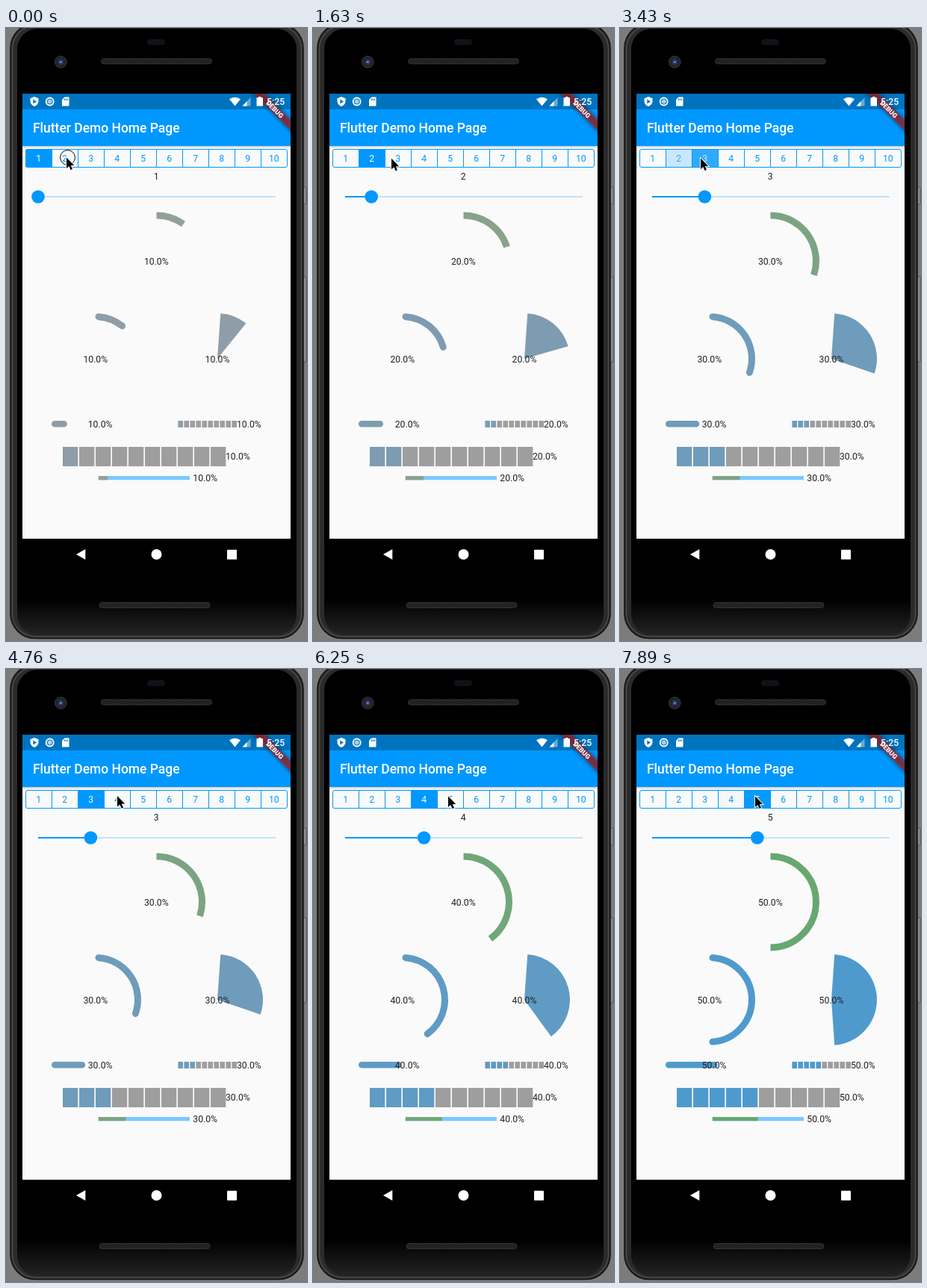
An HTML page that plays this animation: 403 px wide and 821 px high, repeating every 8000 ms.

```html
<!DOCTYPE html>
<html lang="en">
<head>
<meta charset="utf-8">
<style>
html, body { margin: 0; width: 100%; height: 100%; overflow: hidden; background: #7c7c7c; }
svg { display: block; font: 12.23px Roboto, sans-serif; fill: #212121; }
.mid { text-anchor: middle; }
.white { fill: #fff; }
.bold { font-weight: 500; }
</style>
</head>
<body>
<svg id="stage" width="403" height="821" viewBox="0 0 403 821">
  <defs>
    <linearGradient id="shade" x2="0" y2="1">
      <stop stop-color="#000" stop-opacity=".28"/><stop offset="1" stop-color="#000" stop-opacity="0"/>
    </linearGradient>
    <linearGradient id="front" x2="0" y2="1">
      <stop offset=".94"/><stop offset="1" stop-color="#242424"/>
    </linearGradient>
    <pattern id="mesh" width="3" height="3" patternUnits="userSpaceOnUse">
      <rect width="3" height="3" fill="#151515"/><path d="M0 3L3 0" stroke="#3c3c3c"/>
    </pattern>
    <clipPath id="screen"><rect x="22" y="88" width="359" height="596"/></clipPath>
    <filter id="blur" y="-1" height="3"><feGaussianBlur stdDeviation="3"/></filter>
  </defs>

  <!-- phone body -->
  <g fill="#8f8f8f" stroke="#444" stroke-width=".8">
    <rect x="397" y="213" width="5" height="23" rx="1"/>
    <rect x="397" y="333" width="5" height="114" rx="1"/>
  </g>
  <rect x="6" y="-6" width="392" height="823.5" rx="33" fill="#2b2b2b" stroke="#161616" stroke-width="1.6"/>
  <rect x="8.5" y="-3" width="387" height="818" rx="31" fill="none" stroke="#4c4c4c" stroke-width="1.4"/>
  <rect x="15" y="1" width="374" height="812" rx="27" fill="url(#front)"/>
  <g fill="url(#mesh)" stroke="#343434">
    <rect x="127.500" y="41" width="148" height="7" rx="3.500"/>
    <rect x="125" y="769.500" width="148" height="7" rx="3.500"/>
  </g>
  <rect x="189" y="15" width="24" height="8" rx="4" fill="#11111a"/>
  <circle cx="73.300" cy="45.500" r="7.800" fill="#20222a" stroke="#3d3d40"/>
  <circle cx="73.300" cy="45.500" r="4" fill="#26355a"/>
  <circle cx="73.300" cy="45.500" r="1.600" fill="#7286b0"/>
  <g class="white">
    <path d="M94 705L106.300 698V712Z"/><circle cx="201.500" cy="705" r="7"/>
    <rect x="296" y="698.700" width="13" height="13" rx="1"/>
  </g>

  <!-- app -->
  <g clip-path="url(#screen)">
    <rect x="22" y="88" width="359" height="596" fill="#fafafa"/>
    <rect x="22" y="157" width="359" height="4" fill="url(#shade)"/>
    <rect x="22" y="88" width="359" height="70" fill="#0098ff"/>
    <rect x="22" y="88" width="359" height="21" fill="#0073bf"/>
    <text class="white bold" x="36" y="140" font-size="17.47">Flutter Demo Home Page</text>
    <g id="segs"></g>
    <rect x="26.500" y="162.500" width="350" height="24" rx="2.500" fill="none" stroke="#0098ff"/>
    <g id="body"></g>
    <g transform="translate(381 88) rotate(45)">
      <rect x="-55" y="24.500" width="110" height="10.500" opacity=".5" fill="#000" filter="url(#blur)"/>
      <rect x="-55" y="24.500" width="110" height="10.500" fill="#b71c1c" fill-opacity=".63"/>
      <text class="mid white" y="32.900" font-size="8.9" font-weight="900">DEBUG</text>
    </g>
    <g class="white">
      <path d="M38 92L43.500 94.300V98Q43.500 102.500 38 105Q32.500 102.500 32.500 98V94.300Z"/>
      <path d="M36.300 95.500V101.500L41 98.500Z" fill="#0073bf"/>
      <circle cx="58.700" cy="98.500" r="5" fill="none" stroke="#fff" stroke-width="1.8"/>
      <circle cx="58.700" cy="98.500" r="3" fill="#a9cfea"/>
      <path d="M78.500 92.500H84.500V104.500H75V96Z"/>
      <path d="M78.500 94.500v2.500m2-2.500v2.500m2-2.500v2.500" stroke="#0073bf"/>
      <path d="M299 95.300Q306.500 90 314 95.300L306.500 104.500Z"/>
      <path d="M316.500 104.500L327.500 93V104.500Z" opacity=".4"/>
      <path d="M316.500 104.500L322.500 98.200V104.500Z"/>
      <path d="M335.500 93.200H338V92H341.500V93.200H344V104.500H335.500Z"/>
      <text class="bold" x="349" y="103">5:25</text>
    </g>
  </g>
  <g id="pointer">
    <circle id="ring" cx="1.500" cy="0" r="9.900" fill="none" stroke="#000"/>
    <path d="M0 0V14.500L3.300 11.500L5.600 16.500L8 15.400L5.800 10.500H10.200Z" stroke="#fff" stroke-width="1.800" paint-order="stroke" fill="#000"/>
  </g>
</svg>
<script>
const $ = id => document.getElementById(id);
const BLUE = [0, 152, 255], WHITE = [255, 255, 255], GREY = [158, 158, 158];
const LOOP = 8000, TICK = 148.7;            // the screen is refreshed once per tick
const FADE = 180, TOUCH = 40, GLIDE = 222;  // durations in ms

// each tap moves the value up by one
const TAPS = [
  { press: 0, select: 700 },
  { press: 3120, select: 3275 },
  { press: 5500, select: 5530 },
  { press: 7580, select: 7705 }
];
// the pointer rests at START, then glides to each stop
const START = { x: 81, y: 173.5 };
const STOPS = [
  { at: 0, x: 81, y: 177 },
  { at: 1311, x: 108, y: 174.5 },
  { at: 3788, x: 155, y: 172.5 },
  { at: 4450, x: 149, y: 170 },
  { at: 6017, x: 181, y: 170.5 }
];

const clamp = k => Math.max(0, Math.min(1, k));
const smooth = k => k * k * (3 - 2 * k);
const lerp = (a, b, k) => a + (b - a) * k;
const mix = (a, b, k) => `rgb(${a.map((c, i) => Math.round(lerp(c, b[i], k)))})`;

const text = (s, x, y, cls = '') => `<text x="${x}" y="${y}" class="${cls}">${s}</text>`;
const rect = (x, y, w, h, fill) => `<rect x="${x}" y="${y}" width="${w}" height="${h}" fill="${fill}"/>`;
const line = (x1, x2, y, color, w, cap = 'butt') =>
  `<path d="M${x1} ${y}H${x2}" stroke="${color}" stroke-width="${w}" stroke-linecap="${cap}"/>`;

// clockwise from twelve o'clock
function arc(cx, cy, r, from, to) {
  const at = deg => {
    const a = deg * Math.PI / 180;
    return `${cx + r * Math.sin(a)} ${cy - r * Math.cos(a)}`;
  };
  return `${at(from)}A${r} ${r} 0 0 1 ${at(to)}`;
}

function cells(x, y, pitch, w, h, value, color) {
  let out = '';
  for (let i = 0; i < 10; i++) out += rect(x + i * pitch, y, w, h, i < value ? color : '#9e9e9e');
  return out;
}

function segments(t) {
  let out = '';
  for (let i = 1; i <= 10; i++) {
    const x = 26.5 + (i - 1) * 35;
    // cell i fills on tap i - 2 and empties on tap i - 1
    const since = n => TAPS[n] ? t - TAPS[n].select : -LOOP;
    const filled = i === 1 ? 1 : clamp(since(i - 2) / FADE);
    const tint = filled - clamp(since(i - 1) / FADE);
    const touched = since(i - 2) < 0 && since(i - 2) > -TOUCH;
    out += `<rect x="${x}" y="162.5" width="35" height="24" fill="#0098ff" fill-opacity="${touched ? .2 : tint}"/>`;
    if (i > 1) out += rect(x - .5, 162.5, 1, 24, '#0098ff');
    out += `<text class="mid" x="${x + 17.3}" y="178.8" fill="${mix(BLUE, WHITE, tint)}">${i}</text>`;
  }
  return out;
}

function gauges(v) {
  const green = mix(GREY, [46, 178, 66], v / 10), blue = mix(GREY, [0, 150, 252], v / 10);
  const label = v * 10 + '.0%', knob = 43 + (v - 1) * 35.2;
  const gap = 4, end = Math.min(gap + 35 * v, 180 - gap);
  return text(v, 201.3, 202.5, 'mid') +
    line(43, 361, 226, '#bfe3fd', 1.8) + line(43, knob, 226, '#0098ff', 1.8) +
    `<circle cx="${knob}" cy="226" r="8.8" fill="#0098ff"/>` +
    `<path d="M${arc(201.5, 312, 61, 0, v * 36)}" fill="none" stroke="${green}" stroke-width="9"/>` +
    `<path d="M${arc(120, 443, 56.5, gap, end)}" fill="none" stroke="${blue}" stroke-width="9" stroke-linecap="round"/>` +
    `<path d="M283 443L${arc(283, 443, 61, gap, end)}Z" fill="${blue}"/>` +
    text(label, 201.3, 316.7, 'mid') + text(label, 119.8, 447.7, 'mid') + text(label, 283, 447.7, 'mid') +
    line(65.3, 65.3 + 12.2 * v, 530.3, blue, 8.6, 'round') + text(label, 109.7, 534.8) +
    cells(230.4, 526, 8, 6.6, 9, v, blue) + text(label, 309, 534.8) +
    cells(76, 561, 22, 20.3, 26, v, blue) + text(label, 294, 578.3) +
    line(123.8, 246, 602.7, '#7ac8ff', 5.3) + line(123.8, 123.8 + 12.2 * v, 602.7, green, 5.3) +
    text(label, 250.3, 607.2);
}

function pointer(t) {
  let { x, y } = START;
  for (const stop of STOPS) {
    const k = smooth(clamp((t - stop.at) / GLIDE));
    x = lerp(x, stop.x, k);
    y = lerp(y, stop.y, k);
  }
  return `translate(${x} ${y})`;
}

let shown;
function draw() {
  const t = Math.floor(performance.now() % LOOP / TICK) * TICK;
  if (t !== shown) {
    shown = t;
    $('segs').innerHTML = segments(t);
    $('body').innerHTML = gauges(1 + TAPS.filter(tap => t >= tap.select).length);
    $('pointer').setAttribute('transform', pointer(t));
    $('ring').style.opacity = +TAPS.some(tap => t >= tap.press && t < tap.press + TICK);
  }
  requestAnimationFrame(draw);
}
draw();
</script>
</body>
</html>
```
